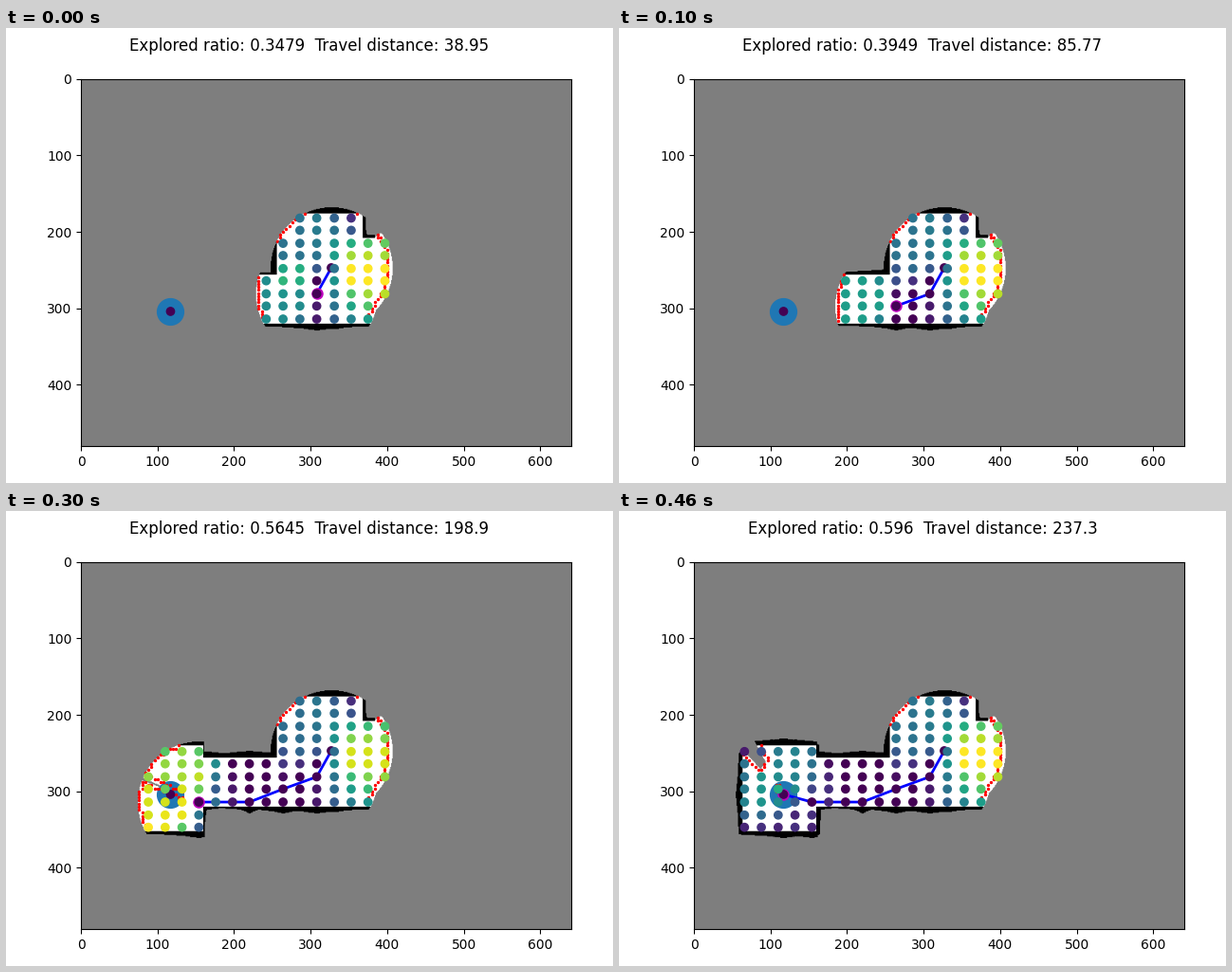
These frames come from a looping animation (640 by 480 pixels, 500 ms). A matplotlib script:

```python
import numpy as np
import matplotlib.pyplot as plt
from matplotlib.animation import FuncAnimation

WALL, UNKNOWN, FREE = 1, 127, 255
W, H = 640, 480
SENSOR_RANGE = 79.05
UTILITY_RANGE = 70
WALL_DEPTH = 9
BLOCK = 4
TILE = 16

ROUTE = np.array([(327, 247), (308, 281), (264, 297),
                  (220, 314), (154, 314), (117, 304)])
BLIND = {4: (200.9, 204.0), 5: (227.4, 242.1)}  # degrees without a reading
RATIOS = [0.3479, 0.3949, 0.4381, 0.5645, 0.596]


def build_world():
    world = np.full((H, W), WALL)
    # left, right, top, bottom in tiles
    rooms = [(16, 23, 11, 20), (23, 30, 13, 20), (24, 30, 9, 13),
             (10, 16, 16, 20), (4, 10, 15, 22)]
    for x0, x1, y0, y1 in rooms:
        world[y0 * TILE:y1 * TILE, x0 * TILE:x1 * TILE] = FREE
    return world


def scan(belief, world, pos, blind):
    """Reveal what a range-limited sensor sees from pos."""
    deg = np.arange(0, 360, 0.1)
    deg = deg[(deg < blind[0]) | (deg > blind[1])]
    c, s = np.cos(np.radians(deg))[:, None], np.sin(np.radians(deg))[:, None]
    t = np.linspace(0, SENSOR_RANGE, 160)
    x = np.rint(pos[0] + t * c).astype(int)
    y = np.rint(pos[1] + t * s).astype(int)
    cell = world[y, x]
    wall = cell == WALL
    depth = np.cumsum(wall, axis=1) * t[1] * (abs(c) + abs(s))
    beyond = np.logical_or.accumulate(wall, axis=1) & ~wall
    seen = (depth < WALL_DEPTH) & ~beyond
    belief[y[seen], x[seen]] = cell[seen]


def find_frontiers(belief):
    """Free blocks that border on unknown ones."""
    small = belief.reshape(H // BLOCK, BLOCK, W // BLOCK, BLOCK).min(axis=(1, 3))
    unknown = np.pad((small == UNKNOWN).astype(int), 1)
    rows, cols = small.shape
    count = sum(unknown[i:i + rows, j:j + cols]
                for i in range(3) for j in range(3) if (i, j) != (1, 1))
    y, x = np.nonzero((small == FREE) & (count > 1) & (count < 8))
    return np.column_stack([x, y]) * BLOCK


def find_nodes(belief):
    xs = (np.arange(29) * W / 29).astype(int)
    ys = (np.arange(29) * H / 29).astype(int)
    grid = np.array([(x, y) for y in ys for x in xs])
    return grid[belief[grid[:, 1], grid[:, 0]] == FREE]


def utility(belief, node, frontiers):
    """Number of frontiers in range with a clear line of sight."""
    gap = frontiers - node
    gap = gap[np.hypot(*gap.T) < UTILITY_RANGE]
    steps = np.linspace(0, 1, 80)
    x = np.rint(node[0] + gap[:, :1] * steps).astype(int)
    y = np.rint(node[1] + gap[:, 1:] * steps).astype(int)
    return int((belief[y, x] == FREE).all(axis=1).sum())


def explore():
    world = build_world()
    belief = np.full((H, W), UNKNOWN)
    scan(belief, world, ROUTE[0], (-1, -1))
    states = []
    for step in range(1, len(ROUTE)):
        scan(belief, world, ROUTE[step], BLIND.get(step, (-1, -1)))
        frontiers = find_frontiers(belief)
        nodes = find_nodes(belief)
        visited = {tuple(p) for p in ROUTE[:step + 1]}
        values = [0 if tuple(n) in visited else utility(belief, n, frontiers)
                  for n in nodes]
        nodes = np.vstack([ROUTE[0], ROUTE[-1], nodes])
        states.append((belief.copy(), frontiers, nodes, np.array([0, 0] + values)))
    return states


states = explore()
legs = np.hypot(*np.diff(ROUTE, axis=0).T)
travelled = np.cumsum(legs)

fig = plt.figure(figsize=(6.4, 4.8), dpi=100)
ax = fig.add_axes([79.05 / W, 39 / H, 516.5 / W, 387.375 / H])
title = fig.suptitle("")

image = ax.imshow(states[0][0], cmap="gray", vmin=WALL, vmax=FREE, aspect="auto")
ax.axis((0, W, H, 0))
ax.scatter(*ROUTE[-1], s=400, color="C0", zorder=1)
path, = ax.plot([], [], "b", linewidth=2)
robot, = ax.plot([], [], "mo", markersize=8)
edge_dots = ax.scatter([], [], c="r", s=2, zorder=3)
node_dots = ax.scatter([0], [0], c=[0], cmap="viridis", zorder=5)


def update(i):
    belief, frontiers, nodes, values = states[i]
    image.set_data(belief)
    edge_dots.set_offsets(frontiers)
    node_dots.set_offsets(nodes)
    node_dots.set_array(values)
    node_dots.set_clim(0, values.max())
    path.set_data(*ROUTE[:i + 2].T)
    robot.set_data(*ROUTE[i + 1:i + 2].T)
    title.set_text(f"Explored ratio: {RATIOS[i]:.4g}  "
                   f"Travel distance: {travelled[i]:.4g}")
    return image, edge_dots, node_dots, path, robot, title


anim = FuncAnimation(fig, update, frames=len(states), interval=100,
                     init_func=lambda: update(0), repeat=True, repeat_delay=0)
plt.show()
```
